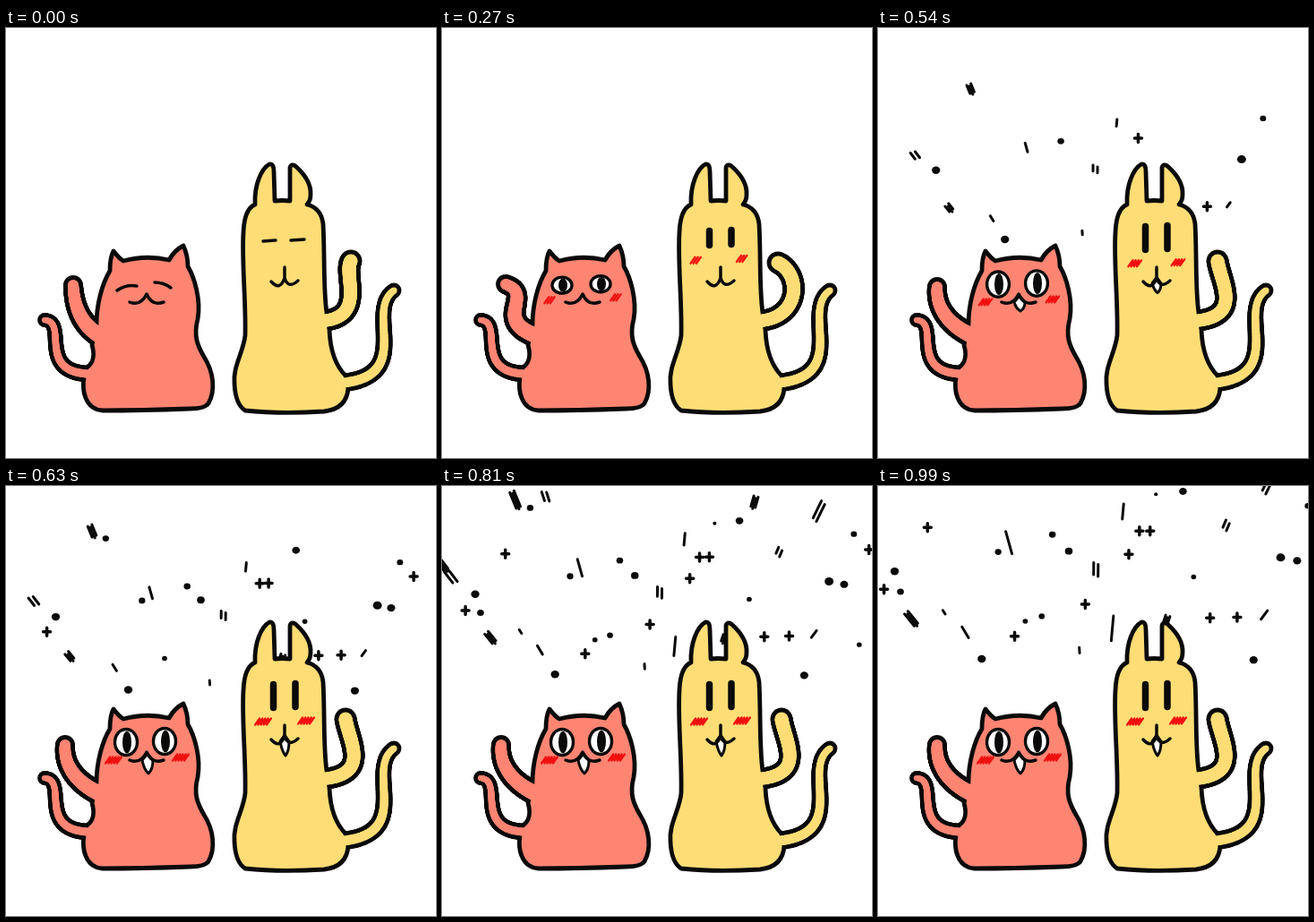
An HTML page with a canvas for the animation above (1080 ms loop, 480 by 480 pixels).

```html
<!DOCTYPE html>
<html lang="en">
<head>
<meta charset="utf-8">
<title>Waving cats</title>
<style>
html, body { margin: 0; height: 100%; overflow: hidden; background: #fff; }
canvas { display: block; width: 100vw; height: 100vh; }
</style>
</head>
<body>
<canvas id="stage" width="480" height="480"></canvas>
<script>
const ctx = document.getElementById('stage').getContext('2d');
const STEP = 90, COUNT = 12, INK = '#0a0a0a', EDGE = 2.4;
const ORIGIN = { x: 240, y: 400 };
const POSES = 'ADBCBADDDDDD'; // straight A, leaning D, bent B, curled C

// Limbs are cubic curves from tip to base with a radius at each end
const red = {
  fill: '#ff8573',
  body: 'M101 331C101 309 107 286 116 271Q116 256 120 249Q126 257 131 260Q157 253 182 259Q188 248 198 243Q203 254 203 266C210 278 218 303 214 325C209 344 214 355 221 367C232 384 234 405 226 419Q222 425 205 425Q150 427 108 427Q94 426 89 413Q85 404 87 390L90 379C98 374 99 364 96 354Z',
  tail: [43, 326, 70, 328, 34, 384, 92, 386], tailR: [5.5, 7],
  armR: [8.5, 11],
  arms: {
    A: [75, 287, 76, 310, 83, 330, 104, 343],
    B: [65, 287, 88, 302, 65, 325, 104, 343],
    C: [71, 286, 104, 298, 56, 325, 104, 343],
    D: [66, 289, 64, 313, 80, 332, 104, 343]
  }
};
const yellow = {
  fill: '#ffdd76',
  body: 'M278 197C277 175 285 157 294 152Q299 151 299 160L300 193Q308 192 317 193L317 156Q318 151 323 154Q341 170 340 186Q340 193 336 197Q352 201 354 219C356 255 354 290 358 318L361 337C362 362 368 377 379 388L382 402C381 416 373 426 355 428Q305 431 267 427Q256 420 255 397C253 378 265 362 267 343C268 305 263 262 265 228Q266 202 278 197Z',
  tail: [433, 293, 400, 316, 456, 388, 376, 396], tailR: [6, 8],
  armR: [10, 9.5],
  arms: {
    A: [385, 260, 376, 275, 403, 322, 354, 327],
    B: [371, 258, 392, 285, 392, 322, 354, 327],
    C: [375, 262, 402, 275, 400, 324, 354, 327],
    D: [379, 260, 383, 285, 408, 322, 354, 327]
  }
};

function random(seed) {
  const s = Math.sin(seed * 127.1) * 43758.5453;
  return s - Math.floor(s);
}

function line(d, width, color = INK) {
  ctx.lineWidth = width;
  ctx.strokeStyle = color;
  ctx.stroke(new Path2D(d));
}

function oval(x, y, rx, ry, color) {
  ctx.beginPath();
  ctx.ellipse(x, y, rx, ry, 0, 0, 7);
  ctx.fillStyle = color;
  ctx.fill();
}

function drawSpark(i, k) {
  const spread = .65 + .05 * k; // everything flies away from the origin
  const dx = (225 * (2 * (i * .618 % 1) - 1)) * spread;
  const dy = (45 + 195 * random(i) - ORIGIN.y) * spread;
  const size = random(i + 50), kind = random(i + 100);
  ctx.save();
  ctx.translate(ORIGIN.x + dx, ORIGIN.y + dy);
  if (kind < .25) {
    line('M-4 0H4M0 -4.5V4.5', 3.5);
  } else if (kind < .5) {
    oval(0, 0, 2 + 3 * size, 2 + 2.5 * size, INK);
  } else {
    ctx.rotate(Math.atan2(dx, -dy));
    const length = 4 + 3.5 * size * (k - 4);
    const strands = 1 + Math.floor(3 * random(i + 150));
    const gap = strands === 2 ? 5 : 2.5;
    for (let s = 0; s < strands; s++) {
      line(`M${(s - (strands - 1) / 2) * gap} ${s % 2 * 2 - length / 2}v${length}`, 3);
    }
  }
  ctx.restore();
}

function drawLimb(p, [tip, base], grow, color) {
  for (let t = 0; t <= 1; t += .01) {
    const u = 1 - t;
    const at = j => u * u * u * p[j] + 3 * u * u * t * p[j + 2] + 3 * u * t * t * p[j + 4] + t * t * t * p[j + 6];
    const r = tip + (base - tip) * t + grow;
    oval(at(0), at(1), r, r, color);
  }
}

function drawFigure(c, pose) {
  const limbs = (grow, color) => {
    drawLimb(c.tail, c.tailR, grow, color);
    drawLimb(c.arms[pose], c.armR, grow, color);
  };
  limbs(EDGE, INK);
  ctx.fillStyle = c.fill;
  ctx.fill(new Path2D(c.body));
  line(c.body, 2 * EDGE);
  limbs(-EDGE, c.fill);
}

function blush(x, y, n) {
  let d = '';
  for (let i = 0; i < n; i++) {
    const left = x - 2.5 + (i - (n - 1) / 2) * 3.2;
    d += `${i && n > 3 ? 'L' : 'M'}${left} ${y + 3.5}l5 -7`;
  }
  line(d, 2.3, '#f01010');
}

function tooth(x, y, w, length) {
  const d = `M${x - w} ${y}L${x} ${y - 7}L${x + w} ${y}Q${x + w} ${y + length * .7} ${x + 1} ${y + length}Q${x - w + 2} ${y + length * .7} ${x - w} ${y}Z`;
  ctx.fillStyle = '#fff';
  ctx.fill(new Path2D(d));
  line(d, 3);
}

function catEye(x, y, open) {
  const rx = 8.5 + 4 * open, ry = 14.5 * open;
  oval(x, y, rx + 1.7, ry + 1.7, INK);
  oval(x, y, rx - 1.7, Math.max(ry - 1.7, 1), '#fff');
  oval(x + 1, y, 5, ry * .85, INK);
}

function drawFaces(k) {
  const e = Math.sin(Math.min(k / 7, 1) * Math.PI / 2);
  const mouth = Math.min(Math.max((k - 4) / 3, 0), 1);
  const strokes = k > 1 ? Math.min(5, 1 + Math.ceil(k / 2)) : 0;
  if (e) {
    catEye(134, 289 - 3 * e, e);
    catEye(177, 287 - 2 * e, e);
    const h = Math.min(16.5, 18.5 * e) - 3.5;
    line(`M298.5 ${234.5 - h}v${2 * h}M323 ${233.5 - h}v${2 * h}`, 7.5);
  } else {
    line('M124 293Q134 286 146 288M166 284Q176 284 184 290M287 238L301 237M318 237L333 236', 3.5);
  }
  blush(120, 300 + 6 * e, strokes);
  blush(192 + 3 * e, 297 + 6 * e, strokes);
  blush(277 + 10 * e, 253 + 10 * e, strokes);
  blush(334 + e, 250 + 12 * e, strokes);
  if (mouth) {
    tooth(158, 306, 6, 15 * mouth);
    tooth(311, 285, 5, 16 * mouth);
  }
  line('M138 306Q150 311 157 297Q163 311 176 306M296 283Q306 294 311 279V267M311 279Q315 292 326 282', 3.5);
}

function draw(now) {
  const k = Math.floor(now / STEP) % COUNT;
  ctx.fillStyle = '#fff';
  ctx.fillRect(0, 0, 480, 480);
  ctx.lineCap = ctx.lineJoin = 'round';
  const sparks = k < 5 ? 0 : Math.min(44, 7 + 11 * (k - 5));
  for (let i = 1; i <= sparks; i++) drawSpark(i, k);
  drawFigure(red, POSES[k]);
  drawFigure(yellow, POSES[k]);
  drawFaces(k);
  requestAnimationFrame(() => draw(performance.now()));
}
draw(0);
</script>
</body>
</html>
```
